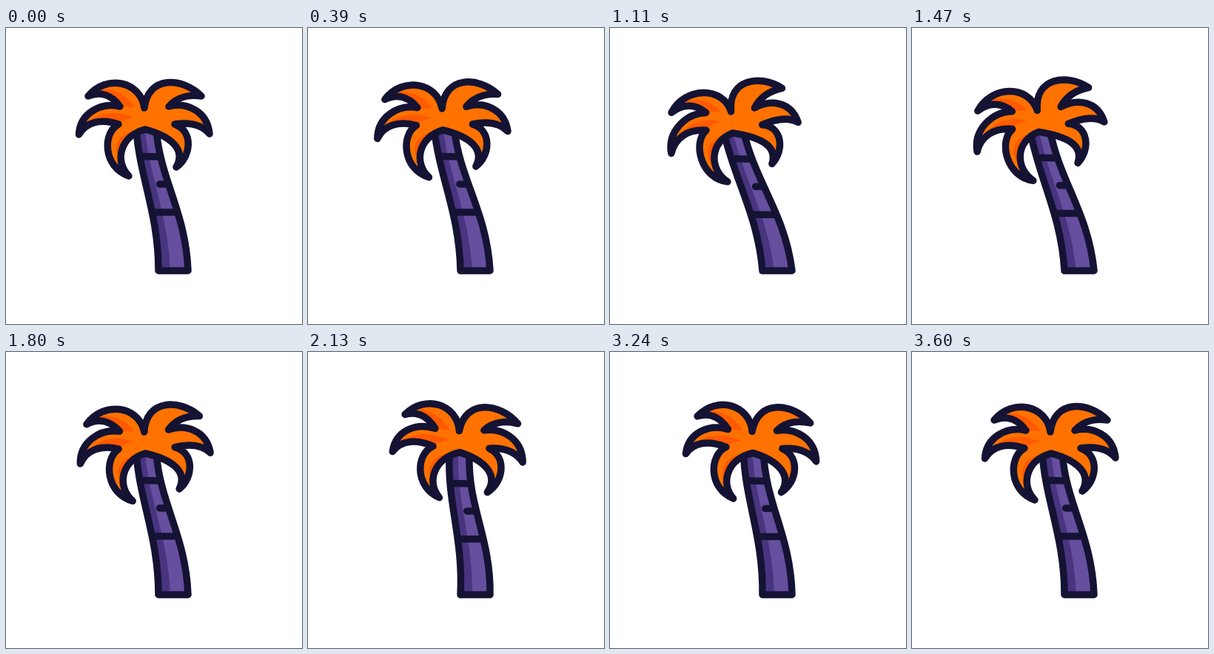
An HTML page with a canvas for the animation above (3630 ms loop, 400 px wide and 400 px high).

```html
<!DOCTYPE html>
<html>
<head>
<meta charset="utf-8">
<style>
  html, body { margin: 0; width: 100%; height: 100%; overflow: hidden; background: #fff; }
  canvas { display: block; }
</style>
</head>
<body>
<canvas id="stage" width="400" height="400"></canvas>
<script>
const ctx = document.getElementById('stage').getContext('2d');
const LOOP = 3630, END = 3600;
const INK = '#141333', ORANGE = '#ff7200', RED = '#ff5a00', VIOLET = '#664f9e', SHADE = '#48347f';

const TRUNK = 'M175,122 L176,136 C180,200 206,250 206,328 L246,328 C243,248 208,205 203,136 L202,122 Z';
const TRUNK_SHADE = 'M175,122 L176,136 C180,200 206,250 206,328 L222,328 C219,250 193,200 188,136 L188,122 Z';
const RINGS = 'M183,173.5 L208,174 M200,249 L229,249 M207.5,211 L217,211';
const CROWN = `M187,108 C182,72 136,62 111,92 C128,85 143,91 154,106
  C128,100 100,115 98.5,144 C108,127 128,122 152,130
  C130,142 131,188 166,200 C146,180 154,146 188,137
  C222,146 244,164 230,188 C250,174 254,140 228,130
  C248,127 264,130 275,143 C272,112 244,100 220,106
  C232,92 250,90 264,92 C238,66 192,64 187,108 Z`;
const CROWN_SHADE = `M122,84 C142,79 163,90 174,107 L154,106 L140,92 Z
  M98,144 C112,118 140,107 173,121 Q160,122 152,130 L115,134 Z
  M151,172 C143,152 160,138 188,136 L170,150 Z`;

// Smooth swing: rest, left at t1, right at t2, back to rest.
function swing(t, t1, t2) {
  const ease = (from, to, a, b) => {
    const u = (t - a) / (b - a);
    return from + (to - from) * u * u * (3 - 2 * u);
  };
  if (t < t1) return ease(0, -1, 0, t1);
  if (t < t2) return ease(-1, 1, t1, t2);
  return ease(1, 0, t2, END);
}

function warp(path, move) {
  return new Path2D(path.replace(/([\d.]+),([\d.]+)/g, (_, x, y) => move(+x, +y).join(',')));
}

function part(outline, fill, shade, shadeFill) {
  ctx.fillStyle = fill;
  ctx.fill(outline);
  ctx.save();
  ctx.clip(outline);
  ctx.fillStyle = shadeFill;
  ctx.fill(shade);
  ctx.restore();
  ctx.stroke(outline);
}

function draw(time) {
  const t = Math.min(time % LOOP, END);
  const lean = swing(t, 1200, 2400);
  const turn = swing(t, 1300, 2600);
  const tilt = (12.2 - 1.3 * turn) * turn * Math.PI / 180;

  const bendTrunk = (x, y) => {
    const h = (328 - y) / 190;
    const drop = (5 * lean + 1.5) * lean * Math.min(1, h * 2.4);
    return [x + (21 - 1.5 * lean) * lean * h ** 1.45, y + drop];
  };

  // Leaves turn around the crown centre, more towards their tips.
  const bendCrown = (x, y) => {
    const dx = x - 188, dy = y - 125;
    const r = Math.hypot(dx, dy);
    const a = Math.atan2(dy, dx) + tilt * r / 85;
    return [188 + 23 * lean + r * Math.cos(a),
            125 + (1.8 * lean - 3.2) * lean + r * Math.sin(a)];
  };

  ctx.fillStyle = '#fff';
  ctx.fillRect(0, 0, 400, 400);
  ctx.strokeStyle = INK;
  ctx.lineWidth = 9.5;
  ctx.lineCap = ctx.lineJoin = 'round';
  part(warp(TRUNK, bendTrunk), VIOLET, warp(TRUNK_SHADE, bendTrunk), SHADE);
  ctx.stroke(warp(RINGS, bendTrunk));
  part(warp(CROWN, bendCrown), ORANGE, warp(CROWN_SHADE, bendCrown), RED);
}

function tick() {
  draw(performance.now());
  requestAnimationFrame(tick);
}
tick();
</script>
</body>
</html>
```
